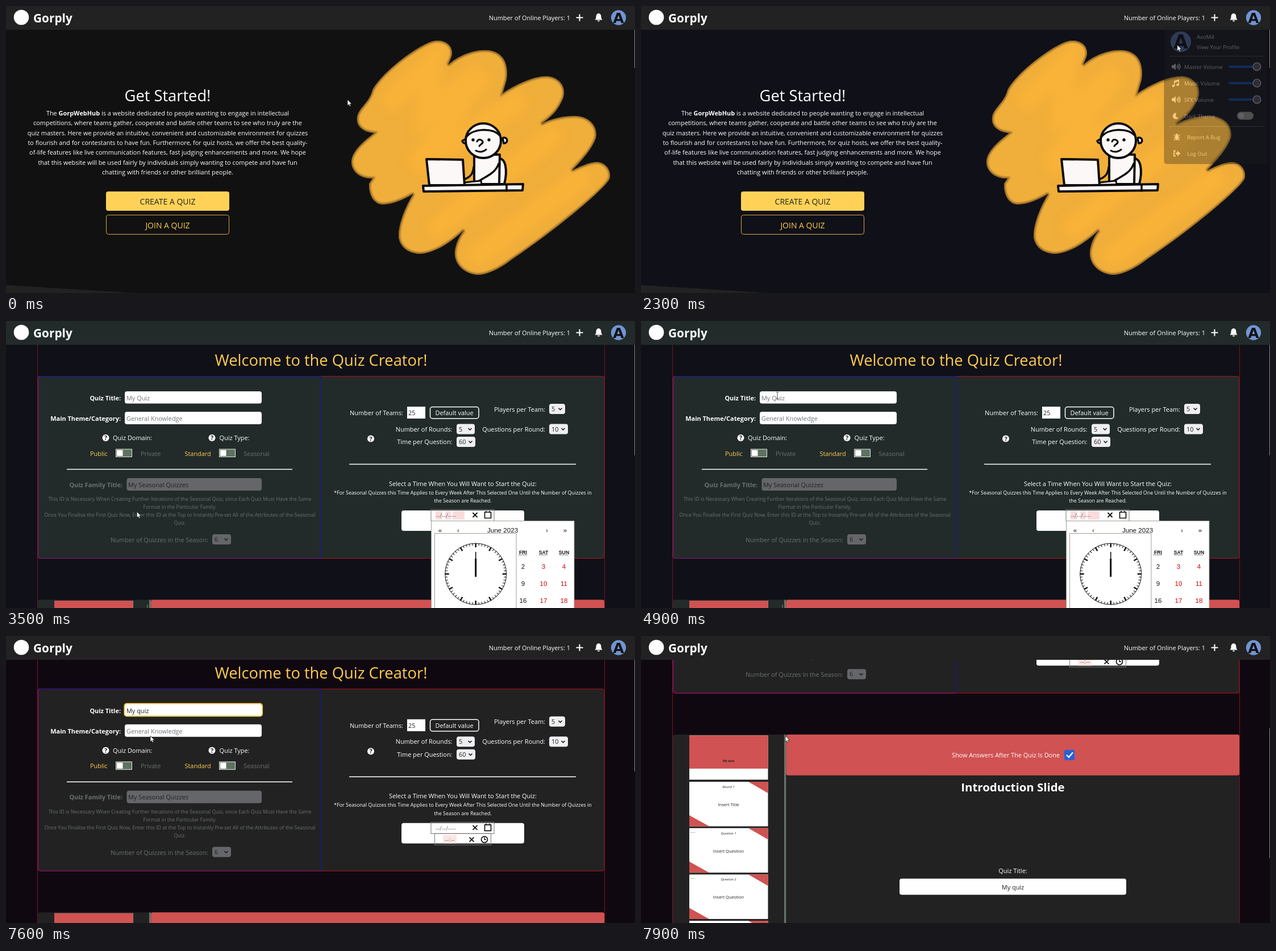
Recreate the animation shown at these times as an HTML page. Size 1107 by 506 pixels, loop 8 s.

```html
<!DOCTYPE html>
<html lang="en">
<head>
<meta charset="utf-8">
<title>Quiz site tour</title>
<style>
html, body { margin: 0; width: 100%; height: 100%; overflow: hidden; background: #111; }
svg { display: block; width: 1107px; height: 506px; }
text { font: 10.92px "Open Sans", "Noto Sans", sans-serif; fill: #fff; white-space: pre; }
.m { text-anchor: middle; }
.e { text-anchor: end; }
.b { font-weight: 700; }
.h1 { font-size: 27.3px; }
.h3 { font-size: 20.4px; }
.btn { font-size: 14px; }
.sm { font-size: 8.9px; }
.menu { font-size: 9.6px; }
.gold { fill: #ffcd4f; }
.dim { fill: #6a7072; }
.ph { fill: #70757a; }
.dk { fill: #222; }
.ar { font: 11.6px "Liberation Sans", Arial, sans-serif; fill: #111; }
.red { fill: #d10000; }
.th { font-size: 7.55px; }
.tag { font-size: 5.7px; font-style: italic; }
.av { font: 700 25px "DejaVu Sans", sans-serif; fill: #111; }
.ink { fill: #fdf8f8; stroke: #0b0b0b; stroke-width: 4; stroke-linejoin: round; stroke-linecap: round; }
.ln { fill: none; }
</style>
</head>
<body>
<svg id="stage" viewBox="0 0 1107 506"></svg>
<script>
const text = (x, y, s, cls = '') => `<text x="${x}" y="${y}" class="${cls}">${s}</text>`;
const rect = (x, y, w, h, fill, r = 0, more = '') =>
  `<rect x="${x}" y="${y}" width="${w}" height="${h}" rx="${r}" fill="${fill}" ${more}/>`;
const dot = (x, y, r, fill, more = '') => `<circle cx="${x}" cy="${y}" r="${r}" fill="${fill}" ${more}/>`;
const path = (d, fill, more = '') => `<path d="${d}" fill="${fill}" ${more}/>`;
const line = (d, color, w = 1, more = '') => path(d, 'none', `stroke="${color}" stroke-width="${w}" ${more}`);
const at = (x, y, s) => `<g transform="translate(${x} ${y})">${s}</g>`;
const lines = (x, y, step, rows, cls) => rows.map((s, i) => text(x, y + i * step, s, cls)).join('');
const group = (id, s) => `<g id="${id}">${s}</g>`;

// ---- header ----
const header = rect(0, 0, 1107, 42, 'var(--panel)') + dot(27, 20, 13.3, '#fff') +
  `<text x="48" y="29" class="b" style="font-size:20.8px">Gorply</text>` +
  text(993, 25, 'Number of Online Players: 1', 'e') +
  line('M1003.5 20.5h12M1009.5 14.5v12', '#fff', 2) +
  path('M1043 13c-4 .5-4.5 4-4.5 6.5q0 3-2 5h13q-2-2-2-5c0-2.5-.5-6-4.5-6.500zm-2 12.500a2 2 0 0 0 4 0z', '#fff') +
  dot(1078, 20.5, 13.2, '#7194d3') + text(1078, 29.5, 'A', 'av m');

// ---- home page ----
const blob = 'M645 148C665 112 735 62 757 61C778 60 790 75 783 92L778 104C797 86 830 74 855 79C880 86 884 108 881 130L874 154' +
  'C895 140 930 122 955 124C980 128 988 150 978 168C970 185 960 195 942 208C960 198 985 193 1005 194C1030 196 1042 215 1038 233' +
  'C1030 255 1010 275 996 290C1010 283 1030 274 1042 275C1060 278 1066 295 1062 305C1052 325 960 400 890 447C870 463 845 475 828 474' +
  'C800 470 788 450 790 432C792 418 797 407 806 395C780 420 750 437 727 437C700 435 690 417 691 402C692 380 705 350 717 331' +
  'C700 341 680 350 662 350C645 348 638 330 639 313L645 304C622 305 606 290 608 272C610 255 630 238 648 224C624 222 616 208 618 196C620 180 640 170 645 148Z';
const ink = (d, cls = '', w = 4) => `<path d="${d}" class="ink ${cls}" style="stroke-width:${w}"/>`;
const paint = path(blob, '#f0ae3a') +
  line('M680 165L750 100L740 190L838 118L720 285L900 170M760 390L960 230M830 440L1010 305', '#feb638', 36,
    'filter="url(#wide)" stroke-linecap="round" opacity=".65"') +
  line(blob, '#8a6428', 5, 'filter="url(#soft)"');
const art = `<g clip-path="url(#edge)">${paint}</g>` +
  ink('M864 270C880 264 883 290 877 314L862 314Z') +
  ink('M824 262L824 314H868L869 262Z') +
  ink('M803 238a5 5 0 1 0 8-5zM874 233a5 5 0 1 1 2 9z', '', 3.5) +
  `<ellipse cx="840" cy="237.500" rx="31" ry="30.500" class="ink"/>` +
  ink('M811 230C822 216 856 214 869 228', 'ln', 3.5) +
  ink('M829 239C831 234 837 235 839 239C840 243 835 243 833 247', 'ln', 3) +
  ink('M827 255Q836 260 845 253', 'ln', 3) +
  dot(822, 236, 2.7, '#0b0b0b') + dot(850, 236, 2.7, '#0b0b0b') +
  ink('M823 284C822 297 816 302 806 306', 'ln', 3.5) + ink('M867 278C862 294 846 300 833 308', 'ln', 3.5) +
  ink('M806 316L808 311L836 308L837 315Z', '', 3) +
  ink('M740 270L804 271L807 316L745 316Z') +
  ink('M734 317L910 314L909 325L735 327Z') + ink('M881 315v11', 'ln', 3.5);

const about = ['competitions, where teams gather, cooperate and battle other teams to see who truly are the',
  'quiz masters. Here we provide an intuitive, convenient and customizable environment for quizzes',
  'to flourish and for contestants to have fun. Furthermore, for quiz hosts, we offer the best quality-',
  'of-life features like live communication features, fast judging enhancements and more. We hope',
  'that this website will be used fairly by individuals simply wanting to compete and have fun',
  'chatting with friends or other brilliant people.'];
const home = path('M0 492L225 506H0Z', '#222') + art +
  text(284.5, 168, 'Get Started!', 'h1 m') +
  text(284.5, 193, 'The <tspan class="b">GorpWebHub</tspan> is a website dedicated to people wanting to engage in intellectual', 'm') +
  lines(284.5, 210.3, 17.35, about, 'm') +
  group('create', rect(176, 327, 217, 34, '#ffd257', 4) +
    rect(176, 327, 217, 34, '#fafff7', 4, 'id="glow"') + text(284.5, 350, 'CREATE A QUIZ', 'btn dk m')) +
  rect(176.5, 368.5, 216, 34, 'none', 4, 'stroke="#d3aa47"') + text(284.5, 391.5, 'JOIN A QUIZ', 'btn gold m') +
  rect(1106, 8, 1, 101, '#8c8c8c');

// ---- profile menu ----
const speaker = path('M-7-2.5h3l4-3.5v12l-4-3.5h-3z', '#fff') +
  line('M2-2q2 2 0 4M3.5-4q4 4 0 8M5.5-5.5q5 5.500 0 11', '#fff', 1.3);
const note = path('M-3-4L6-6.5V3a2.5 2 0 1 1-1.5-2V-3L-1.5-1V5a2.5 2 0 1 1-1.5-2z', '#fff');
const moon = path('M1-5.5A5.5 5.5 0 1 0 5 3Q-2 3 1-5.5z', '#fff');
const bug = `<ellipse cx="0" cy="1" rx="3" ry="4.5" fill="#fff"/>` + dot(0, -4, 2, '#fff') +
  line('M-6 1H6M-5-4l3 3M5-4l-3 3M-5 6l3-3M5 6l-3-3', '#fff', 1.2);
const exit = line('M-2-4.5h-3v9h3', '#fff', 1.8) + path('M-2-1.5h3V-5L6.5 0L1 5V1.5h-3z', '#fff');
const slider = y => line(`M1036 ${y}h44`, '#1b66d9', 4, 'stroke-linecap="round"') +
  dot(1084, y, 6.8, '#696a76', 'stroke="#fff" stroke-width="1.3"');
const menu = rect(921, 38, 181.5, 240, '#202121', 4, 'stroke="#151515"') +
  dot(950, 63, 18, '#7194d3') + `<text x="950" y="75" class="av m" style="font-size:33px">A</text>` +
  text(978, 58, 'AxoM4', 'menu') + text(978, 76, 'View Your Profile', 'menu') +
  line('M930 88.5h165M930 212.5h165', '#686868') +
  ['Master Volume', 'Music Volume', 'SFX Volume', 'Dark Theme'].map((s, i) => {
    const y = 107 + i * 29;
    return at(941, y, [speaker, note, speaker, moon][i]) + text(956, y + 4, s, 'menu') + (i < 3 ? slider(y) : '');
  }).join('') +
  rect(1049, 186.5, 29, 14, '#cfcec6', 7) + dot(1056.5, 193.5, 5, '#fff') +
  at(943, 231, bug) + text(961, 235, 'Report A Bug', 'menu') +
  at(943, 260, exit) + text(961, 264, 'Log Out', 'menu');

// ---- creator page ----
const select = (x, y, w, s, fill = '#efeff2') => rect(x, y, w, 18, fill, 4) + text(x + 4, y + 13, s, 'dk') +
  line(`M${x + w - 11.5} ${y + 7.5}l3 3l3-3`, '#222', 1.6);
const help = (x, y) => dot(x, y, 6, '#fff') + text(x, y + 4, '?', 'm b dk');
const toggle = (x, y) => rect(x + .5, y + .5, 28, 13.5, '#5d7260', 0, 'stroke="#e4e8e4"') + rect(x + 2, y + 2, 10.5, 10.5, '#fff');
const cross = (x, y) => line(`M${x - 4} ${y - 4}l8 8m0-8l-8 8`, '#111', 1.8);

const ticks = Array.from({ length: 60 }, (_, i) =>
  `<path d="M0-54v${i % 5 ? 4 : 7}" stroke="#111" stroke-width="${i % 5 ? 1 : 2.5}" transform="rotate(${i * 6})"/>`).join('');
const clock = rect(754.5, 374.5, 143.5, 150, '#fff', 0, 'stroke="#a0a096"') +
  at(826.7, 446, dot(0, 0, 54, '#fff', 'stroke="#111"') + ticks + line('M0 5V-27', '#111', 3) + line('M0 5V-39', '#111', 1.6));
const calendar = rect(748.5, 352.5, 251.5, 180, '#fff', 0, 'stroke="#a0a096"') +
  [[764, '«'], [796, '‹'], [874, 'June 2023'], [952, '›'], [984, '»']].map(([x, s]) => text(x, 373, s, 'ar m')).join('') +
  ['FRI', 'SAT', 'SUN'].map((s, c) => {
    const x = 910 + c * 36;
    return `<text x="${x}" y="410.5" class="ar b m" style="font-size:8.7px;font-weight:700">${s}</text>` +
      line(`M${x - 8} 412.5h16`, '#111', 1, 'stroke-dasharray="1 1"') +
      [2, 9, 16].map((d, r) => text(x, 437 + r * 30, d + c, 'ar m' + (c ? ' red' : ''))).join('');
  }).join('') + clock;

const leftForm = text(202, 140, 'Quiz Title:', 'e b') + text(202, 176, 'Main Theme/Category:', 'e b') +
  rect(209, 124, 241, 21.5, '#fff', 4) +
  rect(208.5, 123.5, 242.5, 22, 'none', 4, 'id="ring" stroke="#ffd04d" stroke-width="2"') +
  `<text id="title" x="212" y="140"></text>` + rect(212, 129, 1, 14, '#111', 0, 'id="caret"') +
  rect(209, 160, 241, 22, '#fff', 4) + text(212, 176, 'General Knowledge', 'ph') +
  help(175.5, 206) + text(188, 210, 'Quiz Domain:') + help(362.5, 206) + text(375.5, 210, 'Quiz Type:') +
  text(148, 237.5, 'Public', 'gold') + toggle(193, 225.5) + text(237, 237.5, 'Private', 'dim') +
  text(314.5, 237.5, 'Standard', 'gold') + toggle(375, 225.5) + text(418, 237.5, 'Seasonal', 'dim') +
  line('M107 261.5H504', '#fff', 1.5) +
  text(205, 292.5, 'Quiz Family Title:', 'e b dim') + rect(212.5, 277, 237.5, 22, '#65666a', 4) +
  text(215, 292.5, 'My Seasonal Quizzes', 'dk') +
  lines(306, 317, 14.1, [
    'This ID is Necessary When Creating Further Iterations of the Seasonal Quiz, since Each Quiz Must Have the Same',
    'Format in the Particular Family.',
    'Once You Finalise the First Quiz Now, Enter this ID at the Top to Instantly Pre-set All of the Attributes of the Seasonal',
    'Quiz.'], 'sm dim m') +
  text(356, 390, 'Number of Quizzes in the Season:', 'e dim') + select(363, 376, 33, '6', '#65666a');

const rightForm = text(699, 166, 'Number of Teams:', 'e') + rect(706, 151, 32, 21, '#fff') + text(708, 166, '25', 'dk') +
  rect(746.5, 151.5, 85.5, 20.5, 'none', 4, 'stroke="#fff" stroke-width="1.5"') + text(789, 166, 'Default value', 'm') +
  text(949, 159.5, 'Players per Team:', 'e') + select(956, 146, 28, '5') +
  text(785.5, 194.5, 'Number of Rounds:', 'e') + select(793, 181.5, 32, '5') +
  text(949, 194.5, 'Questions per Round:', 'e') + select(956, 181.5, 33, '10') +
  text(785.5, 217, 'Time per Question:', 'e') + select(793, 204, 33, '60') + help(642, 207.5) +
  line('M604 252.5H1003', '#fff', 1.5) +
  text(804, 290.5, 'Select a Time When You Will Want to Start the Quiz:', 'm') +
  lines(804, 305.5, 14.2, ['*For Seasonal Quizzes this Time Applies to Every Week After This Selected One Until the Number of Quizzes in',
    'the Season are Reached.'], 'sm m') +
  rect(696, 334, 216, 36, '#fff', 4) +
  rect(748, 332.5, 111, 20, 'none', 0, 'stroke="#777"') + rect(754.5, 352.5, 99, 20, 'none', 0, 'stroke="#777"') +
  group('pink', rect(756, 335, 12, 15, '#fbdcdc') + rect(773, 335, 10, 15, '#fbdcdc') + rect(786, 335, 21, 15, '#fbdcdc')) +
  text(756, 347, '--/--/----', 'ph') + cross(825.5, 342) +
  line('M842.5 337h11v10.5h-11zM845 335v3m6-3v3', '#111', 1.7) +
  rect(769, 355, 24, 15, '#fbe6e4') + text(781, 367, '--:--', 'ph m') + cross(819.5, 363) +
  dot(842, 363, 5.5, 'none', 'stroke="#111" stroke-width="1.7"') + line('M842 359v4h3', '#111', 1.4);

const slide = i => {
  const y = 493 + i * 81.7;
  if (!i) return rect(85, y, 138.5, 78, '#fff') + rect(85, y, 138.5, 58.5, '#d05252') +
    `<text x="154" y="540" class="b m dk" style="font-size:5.3px">My quiz</text>`;
  return rect(85, y, 138.5, 78.5, '#fff') +
    path(`M189 ${y}h34.5v20zM85 ${y + 59}v19.5h35z`, '#d05252') +
    text(154, y + 11, i > 1 ? 'Question ' + (i - 1) : 'Round 1', 'tag m dk') +
    (i > 1 ? `<text x="87" y="${y + 8}" class="dk" style="font-size:2.5px">Round 1</text>` : '') +
    text(154, y + 43, i > 1 ? 'Insert Question' : 'Insert Title', 'th m dk');
};
const slides = rect(56, 491.5, 997, 420, 'var(--panel)', 4) + [0, 1, 2, 3, 4].map(slide).join('') +
  rect(252, 491.5, 3.2, 420, '#68736a') + rect(248.5, 500, 1, 8, '#8a8f8c', 0, 'id="grip"') +
  rect(255.2, 491.5, 798, 72, '#d05252', 4) + text(737, 532, 'Show Answers After The Quiz Is Done', 'e') +
  rect(745, 518.5, 18, 18, '#2562d8', 2.5) + line('M749 527.5l4 4l7-8.5', '#fff', 2.2) +
  text(654.5, 592, 'Introduction Slide', 'h3 b m') + text(654.5, 736, 'Quiz Title:', 'm') +
  rect(455, 745.5, 399, 28.5, '#fff', 4) + text(654.5, 764.5, 'My quiz', 'm dk');

const creator = group('scroll', text(554.5, 79, 'Welcome to the Quiz Creator!', 'h1 gold m') +
  rect(56.5, 97.5, 996.5, 321, 'var(--panel)', 4, 'stroke="#b01218"') +
  line('M57 97.5H554.5V418', '#1414b4') + line('M554 418.5H60.5q-4 0-4-4V101.5q0-4 4-4', '#8c1080') +
  leftForm + rightForm + slides + line('M55.5 42V900M1053.5 42V900', '#7c1420') + group('picker', calendar)) +
  rect(1106, 8, 1, 229, '#8c8c8c', 0, 'id="thumb"');

// ---- pointers, hot spot at the origin ----
const arrow = path('M0 0V10.5L2.4 8.4L4.1 12L5.8 11.2L4.2 7.7H7.4Z', '#fff', 'stroke="#111" stroke-width=".7"');
const hand = path('M-1.2 8V1Q0-1 1.2 1V5.5Q3 4.5 3.5 6Q5 5 5.7 6.5Q7.5 6 7.5 8V11Q7 14.5 5 14.5H1Q-1 13-4 8.5Q-4 6.5-2.5 7.3Z',
  '#fff', 'stroke="#111" stroke-width=".9"');
const beam = line('M-2.5-5.5Q0-6 0-4.5Q0-6 2.5-5.5M0-4.5V6M-2.5 6.5Q0 7 0 5.5Q0 7 2.5 6.5', '#555', 1);

const stage = document.getElementById('stage');
stage.innerHTML = `<defs><filter id="soft"><feGaussianBlur stdDeviation="1.5"/></filter>
<filter id="wide"><feGaussianBlur stdDeviation="9"/></filter><clipPath id="edge">${path(blob, '#000')}</clipPath></defs>` +
  rect(0, 0, 1107, 506, 'var(--bg)') + group('home', home) + group('creator', creator) + header + group('menu', menu) +
  group('pointer', group('arrow', arrow) + group('hand', hand) + group('beam', beam));
const el = id => document.getElementById(id);
const set = (id, name, v) => el(id).setAttribute(name, v);
const show = (id, on) => set(id, 'opacity', +on);

// ---- motion ----
const clamp = v => Math.min(1, Math.max(0, v));
const ramp = (t, a, b) => clamp((t - a) / (b - a));
const moves = [[0, 601, 165], [900, 1076, 18], [2100, 1076, 18], [2900, 230, 342], [3400, 230, 342],
  [4400, 240, 131], [7400, 240, 131], [7600, 254, 176], [8000, 254, 176]];
const keys = [[5500, 'M'], [5900, 'My'], [6100, 'My '], [6600, 'My q'], [6700, 'My qui'], [6800, 'My quiz']];

function pointerAt(t) {
  const i = moves.findIndex(m => m[0] > t);
  const [t0, x0, y0] = moves[i - 1], [t1, x1, y1] = moves[i];
  const p = ramp(t, t0, t1), k = p * p * (3 - 2 * p);
  return [x0 + (x1 - x0) * k, y0 + (y1 - y0) * k];
}

function draw(t) {
  const first = t < 3400, focus = ramp(t, 4900, 5100);
  stage.style.setProperty('--bg', t < 1000 ? '#111111' : t < 7500 ? '#101018' : '#100810');
  stage.style.setProperty('--panel', first || t >= 7500 ? '#222222' : '#222b2a');
  show('home', first);
  show('creator', !first);
  set('menu', 'opacity', ramp(t, 900, 1200) * (1 - ramp(t, 2100, 2400)));

  const [x, y] = pointerAt(t);
  const onButton = first && x > 176 && x < 393 && y > 327 && y < 361;
  const onAvatar = first && Math.hypot(x - 1078, y - 20) < 13;
  const onField = !first && x > 209 && x < 450 && y > 124 && y < 182 && t < 7500;
  set('pointer', 'transform', `translate(${x} ${y})`);
  show('hand', onButton || onAvatar);
  show('beam', onField);
  show('arrow', !(onButton || onAvatar || onField));

  const hover = onButton ? ramp(t, 2600, 2900) : 0, grow = 1 + .02 * hover;
  set('glow', 'opacity', hover);
  set('create', 'transform', `translate(284.5 344) scale(${grow}) translate(-284.5 -344)`);

  const last = keys.filter(k => k[0] <= t).pop() || [5000, ''];
  el('title').textContent = last[1] || 'My Quiz';
  set('title', 'class', last[1] ? 'dk' : 'ph');
  set('ring', 'opacity', focus);
  show('caret', t >= 5000 && Math.floor((t - last[0]) / 500) % 2 === 0);
  const width = last[1] ? el('title').getComputedTextLength() : 0;
  set('caret', 'x', 212 + width);
  set('picker', 'opacity', 1 - ramp(t, 4900, 5100));
  show('pink', t < 5000);

  const scroll = Math.max(0, (t - 7596) * 1.045);
  set('scroll', 'transform', `translate(0 ${-scroll})`);
  set('thumb', 'y', 8 + scroll * .487);
  show('grip', scroll === 0);
}

const start = performance.now();
function tick() {
  const t = (performance.now() - start) % 8000;
  draw(Math.floor(t / 100) * 100); // ten pictures a second
  requestAnimationFrame(tick);
}
tick();
</script>
</body>
</html>
```
